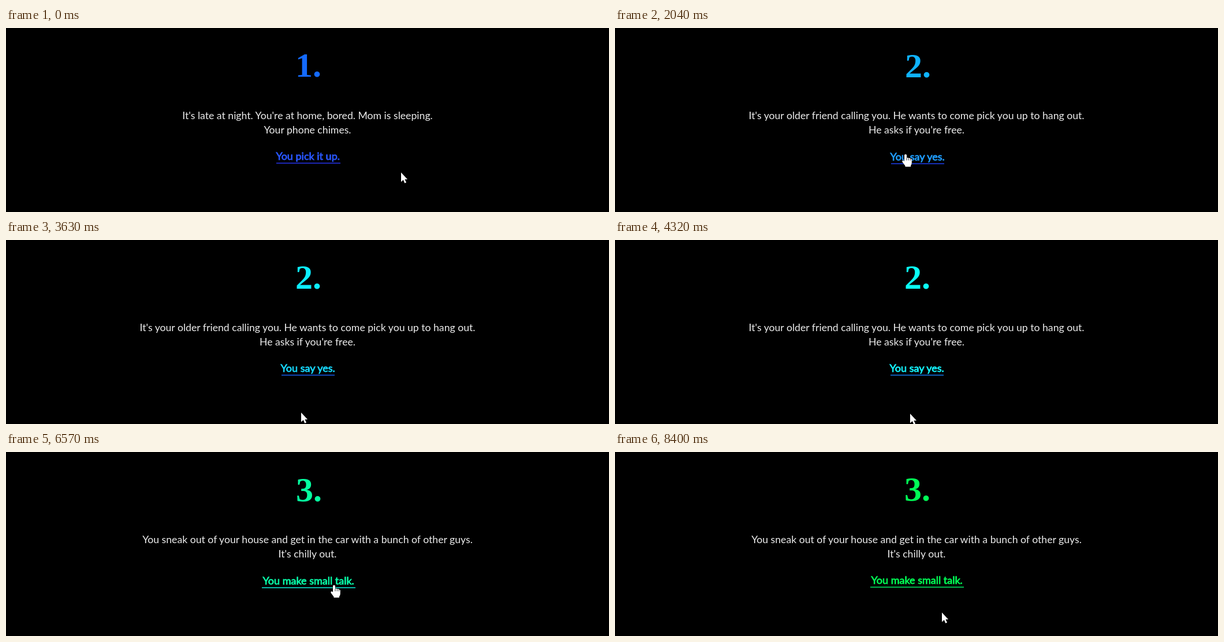
Write an HTML page that moves like this. It is 1044 px wide and 321 px high and loops after 8.43 s.

```html
<!DOCTYPE html>
<html lang="en">
<head>
<meta charset="utf-8">
<title>Night story</title>
<style>
  html, body { margin: 0; width: 100%; height: 100%; overflow: hidden; background: #000; }
  svg { display: block; width: 1044px; height: 321px; }
  text { text-anchor: middle; font: 17.65px Lato, "Open Sans", sans-serif; fill: #ececec; }
  .number { font: bold 60px "Liberation Serif", "Noto Serif", serif; fill: var(--number); }
  .link { font-size: 18px; fill: var(--link); stroke: var(--link); stroke-width: .8px; }
  .rule { fill: var(--rule); }
  #cursor path { fill: #fff; stroke: #000; stroke-width: 1px; paint-order: stroke; }
  #hand .gap { fill: none; stroke-width: .8px; }
</style>
</head>
<body>
<svg viewBox="0 0 1044 321">
  <g id="pages"></g>
  <g id="cursor">
    <path id="arrow" d="M0 0V16.5L3.8 13L6.3 18.8L9 17.6L6.5 12H11Z"/>
    <g id="hand">
      <path d="M-2 1.6Q0 -1.2 2 1.6V7Q4 5.6 5.3 7.2Q7.4 6.2 8.4 8Q10.6 7.4 10.8 9.8V15Q10.8 18 9 20V22H-.5V20.4L-5.3 14Q-6.3 12 -4.8 11.2Q-3.4 10.8 -2 12.6Z"/>
      <path class="gap" d="M2 7V11M5.3 7.4V11M8.4 8.2V11"/>
    </g>
  </g>
</svg>
<script>
const LOOP = 8430, STEP = 30;
const byId = id => document.getElementById(id);

const pages = [
  { from: 0, rule: 111, link: "You pick it up.",
    lines: ["It's late at night. You're at home, bored. Mom is sleeping.", "Your phone chimes."] },
  { from: 1900, rule: 92, link: "You say yes.",
    lines: ["It's your older friend calling you. He wants to come pick you up to hang out.", "He asks if you're free."] },
  { from: 6350, rule: 162, link: "You make small talk.",
    lines: ["You sneak out of your house and get in the car with a bunch of other guys.", "It's chilly out."] }
];

byId("pages").innerHTML = pages.map((page, i) => `
  <g class="page">
    <text x="522" y="159">${page.lines[0]}</text>
    <text x="522" y="184">${page.lines[1]}</text>
    <g class="shaky">
      <text class="number" x="523.4" y="85">${i + 1}.</text>
      <text class="link" x="522.7" y="230">${page.link}</text>
      <rect class="rule" x="${Math.round(523 - page.rule / 2)}" y="235" width="${page.rule}" height="1.4"/>
    </g>
  </g>`).join("");

const groups = [...document.querySelectorAll(".page")];
const shaky = [...document.querySelectorAll(".shaky")];

// Each stop is [time, ...values]; segments are eased by the given curve.
function along(stops, t, ease = k => k) {
  const i = stops.findIndex(stop => stop[0] > t);
  if (i === 0) return stops[0].slice(1);
  if (i < 0) return stops[stops.length - 1].slice(1);
  const a = stops[i - 1], b = stops[i];
  const k = ease((t - a[0]) / (b[0] - a[0]));
  return a.slice(1).map((v, j) => v + (b[j + 1] - v) * k);
}
const smooth = k => k * k * (3 - 2 * k);

const path = [
  [90, 684, 252], [840, 524, 224], [1050, 503, 220],
  [3180, 503, 220], [3680, 511, 303],
  [5240, 511, 303], [5340, 513, 303], [6000, 568, 232],
  [7020, 568, 232], [7500, 566, 280]
];
const ruleHue = [[0, 236], [3000, 228], [4320, 212], [5340, 198], [6570, 174], [8400, 145]];

function shake(t) {
  const phase = t % 100;
  if (phase < 35) return [0, 0];
  return phase < 75 ? [1, 1] : [-1, 0];
}

function render(t) {
  const left = 1 - t / LOOP;
  const hue = 140 + 78 * left;
  const style = byId("pages").style;
  const paint = (name, h, light) => style.setProperty(name, `hsl(${h} 100% ${light}%)`);
  paint("--number", hue, 50 + 4 * left);
  paint("--link", hue + 9 * left, 50 + 8 * left);
  paint("--rule", along(ruleHue, t)[0], 50 + 8 * left);

  const current = pages.filter(page => page.from <= t).length - 1;
  groups.forEach((g, i) => g.setAttribute("display", i === current ? "inline" : "none"));
  shaky[current].setAttribute("transform", `translate(${shake(t)})`);

  const [x, y] = along(path, t, smooth).map(Math.round);
  const half = pages[current].rule / 2;
  const hover = y < 238 && Math.abs(x - 523) < half;
  const pointing = hover || (t > 6000 && t < 7100);
  byId("cursor").setAttribute("transform", `translate(${x} ${y})`);
  byId("hand").setAttribute("display", pointing ? "inline" : "none");
  byId("arrow").setAttribute("display", pointing ? "none" : "inline");
}

const start = performance.now();
function tick() {
  const t = (performance.now() - start) % LOOP;
  render(Math.floor(t / STEP) * STEP);
  requestAnimationFrame(tick);
}
tick();
</script>
</body>
</html>
```
